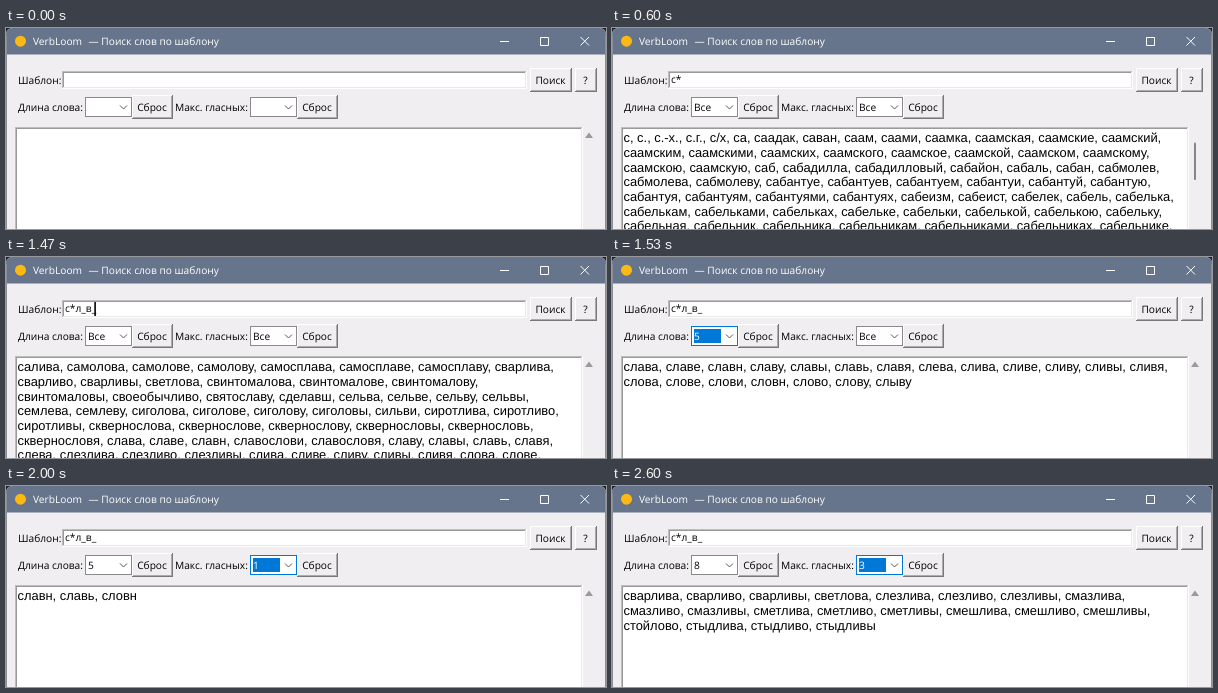
Recreate the animation shown at these times as an HTML page. Size 600 by 201 pixels, loop 3000 ms.

```html
<!DOCTYPE html>
<html lang="ru">
<head>
<meta charset="utf-8">
<title>VerbLoom</title>
<style>
  html, body { margin: 0; width: 100%; height: 100%; overflow: hidden; background: #1b2029; }
  svg { display: block; }
  text { text-rendering: geometricPrecision; white-space: pre; }
  .ui { font: 10.2px "Open Sans", "Noto Sans", sans-serif; fill: #000; }
  .list { font: 12.9px "Liberation Sans", Arial, sans-serif; fill: #000; }
  .mid { text-anchor: middle; }
  .light { fill: #fff; }
</style>
</head>
<body>
<svg id="stage" width="600" height="201" viewBox="0 0 600 201"></svg>
<script>
const LOOP = 3000;

// Each scene holds until the next one starts.
const scenes = [
  { at: 0, mask: "", size: "", vowels: "", words: [] },
  { at: 530, mask: "с*", size: "Все", vowels: "Все", thumb: true, words: [
    "с, с., с.-х., с.г., с/х, са, саадак, саван, саам, саами, саамка, саамская, саамские, саамский,",
    "саамским, саамскими, саамских, саамского, саамское, саамской, саамском, саамскому,",
    "саамскою, саамскую, саб, сабадилла, сабадилловый, сабайон, сабаль, сабан, сабмолев,",
    "сабмолева, сабмолеву, сабантуе, сабантуев, сабантуем, сабантуи, сабантуй, сабантую,",
    "сабантуя, сабантуям, сабантуями, сабантуях, сабеизм, сабеист, сабелек, сабель, сабелька,",
    "сабелькам, сабельками, сабельках, сабельке, сабельки, сабелькой, сабелькою, сабельку,",
    "сабельная, сабельник, сабельника, сабельникам, сабельниками, сабельниках, сабельнике,"
  ] },
  { at: 1000, mask: "с*л_в_", size: "Все", vowels: "Все", caret: true, words: [
    "салива, самолова, самолове, самолову, самосплава, самосплаве, самосплаву, сварлива,",
    "сварливо, сварливы, светлова, свинтомалова, свинтомалове, свинтомалову,",
    "свинтомаловы, своеобычливо, святославу, сделавш, сельва, сельве, сельву, сельвы,",
    "семлева, семлеву, сиголова, сиголове, сиголову, сиголовы, сильви, сиротлива, сиротливо,",
    "сиротливы, сквернослова, сквернослове, сквернослову, сквернословы, сквернословь,",
    "сквернословя, слава, славе, славн, славослови, славословя, славу, славы, славь, славя,",
    "слева, слезлива, слезливо, слезливы, слива, сливе, сливу, сливы, сливя, слова, слове,"
  ] },
  { at: 1530, mask: "с*л_в_", size: "5", vowels: "Все", focus: "size", words: [
    "слава, славе, славн, славу, славы, славь, славя, слева, слива, сливе, сливу, сливы, сливя,",
    "слова, слове, слови, словн, слово, слову, слыву"
  ] },
  { at: 2000, mask: "с*л_в_", size: "5", vowels: "1", focus: "vowels", words: [
    "славн, славь, словн"
  ] },
  { at: 2530, mask: "с*л_в_", size: "8", vowels: "3", focus: "vowels", words: [
    "сварлива, сварливо, сварливы, светлова, слезлива, слезливо, слезливы, смазлива,",
    "смазливо, смазливы, сметлива, сметливо, сметливы, смешлива, смешливо, смешливы,",
    "стойлово, стыдлива, стыдливо, стыдливы"
  ] }
];

const rect = (x, y, w, h, fill, extra = "") =>
  `<rect x="${x}" y="${y}" width="${w}" height="${h}" fill="${fill}" ${extra}/>`;
const line = (d, color, width = 1) =>
  `<path d="${d}" fill="none" stroke="${color}" stroke-width="${width}"/>`;
const label = (x, y, s, cls = "ui") =>
  `<text x="${x}" y="${y}" class="${cls}">${s}</text>`;

// Nested rectangles give the two-tone bevels.
const button = (x, y, w, h, s) =>
  rect(x, y, w, h, "#787878") +
  rect(x, y, w - 1, h - 1, "#fff") +
  rect(x + 1, y + 1, w - 2, h - 2, "#acacac") +
  rect(x + 1, y + 1, w - 3, h - 3, "#f0eef1") +
  label(x + w / 2 - .5, y + h / 2 + 3.6, s, "ui mid");

const sunken = (x, y, w, h) =>
  rect(x, y, w, h, "#fff") +
  rect(x, y, w - 1, h - 1, "#bdbdbd") +
  rect(x + 1, y + 1, w - 2, h - 2, "#e8e8e8") +
  rect(x + 1, y + 1, w - 3, h - 3, "#9a9a9a") +
  rect(x + 2, y + 2, w - 4, h - 4, "#fff");

function combo(x, value, focused) {
  const edge = focused ? "#0078d7" : "#8a8a8a";
  return rect(x + .5, 69.5, 46, 19, "#fff", `stroke="${edge}"`) +
    (focused ? rect(x + 3, 72, 27, 14, "#0078d7") : "") +
    label(x + 3, 82.8, value, focused ? "ui light" : "ui") +
    line(`M${x + 35} 77.5l3.5 3.5l3.5-3.5`, "#555");
}

const chrome =
  rect(0, 0, 600, 201, "#1b2029") +
  '<path d="M0 201V7Q0 0 7 0H593Q600 0 600 7V201Z" fill="#f0eef1"/>' +
  '<path d="M0 26.6V7Q0 0 7 0H593Q600 0 600 7V26.6Z" fill="#66748c"/>' +
  line("M.5 7V201M599.5 7V201", "#8b8e96") +
  '<circle cx="14.5" cy="13.2" r="5.5" fill="#fdb913"/>' +
  label(27, 17, "VerbLoom", "ui light") +
  label(82.5, 17, "— Поиск слов по шаблону", "ui light") +
  line("M494 13.5h9M534.5 9.5h8v8h-8zM574.5 9l8.5 8.5M583 9l-8.5 8.5", "#fff") +
  label(12, 55.5, "Шаблон:") +
  sunken(56, 43, 465, 18) +
  button(524, 40, 42, 24, "Поиск") +
  button(569, 40, 22, 24, "?") +
  label(12, 82.8, "Длина слова:") +
  button(126, 67, 41, 24, "Сброс") +
  label(169, 82.8, "Макс. гласных:") +
  button(291, 67, 41, 24, "Сброс") +
  sunken(9, 99, 568, 120);

const render = s => chrome +
  label(59, 55, s.mask) +
  (s.caret ? rect(88.3, 45, 1.6, 14, "#000") : "") +
  combo(79, s.size, s.focus === "size") +
  combo(244, s.vowels, s.focus === "vowels") +
  (s.thumb
    ? rect(582, 114.5, 2, 37.5, "#858585", 'rx="1"')
    : '<path d="M579 110L583 104.5L587 110Z" fill="#9a9a9a"/>') +
  s.words.map((w, i) => label(11.5, 114.2 + i * 14.7, w, "list")).join("");

const stage = document.getElementById("stage");
const start = performance.now();
let shown;

function tick() {
  const t = (performance.now() - start) % LOOP;
  const scene = scenes.findLast(s => s.at <= t);
  if (scene !== shown) {
    stage.innerHTML = render(scene);
    shown = scene;
  }
  requestAnimationFrame(tick);
}
tick();
</script>
</body>
</html>
```
